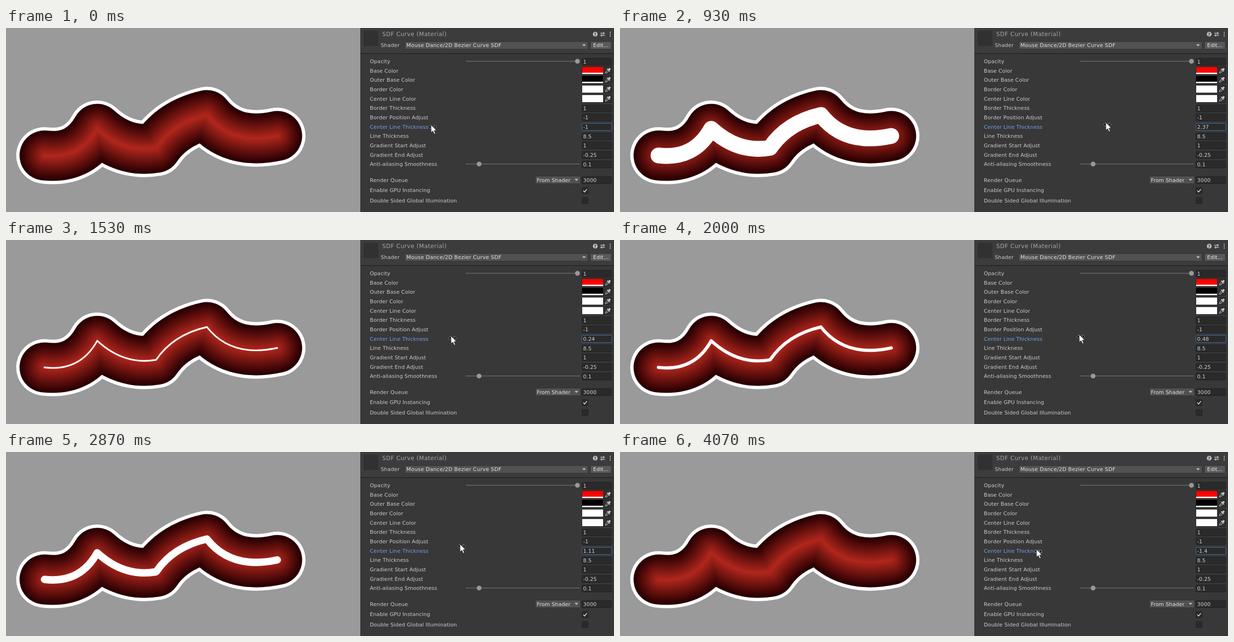
An HTML page that plays this animation: 1280x387 px, repeating every 4870 ms.

```html
<!DOCTYPE html>
<html lang="en">
<head>
<meta charset="utf-8">
<title>SDF curve inspector</title>
<style>
html, body { margin: 0; height: 100%; overflow: hidden; background: #9a9a9a }
svg { display: block; width: 100%; height: 100% }
text { font: 11px "DejaVu Sans", sans-serif; letter-spacing: .1px; fill: #cbcbcb; white-space: pre }
.tube use { fill: none; stroke-linecap: round; stroke-linejoin: round }
</style>
</head>
<body>
<svg id="stage" viewBox="0 0 1280 387"></svg>
<script>
const LOOP = 4870, STEP = 1000 / 15;
const UNIT = 7;               // pixels per thickness unit
const ROW = 19.64, FIRST_ROW = 70.1;
const EDGE = 7.5 * UNIT;      // radius where the border begins

const text = (x, y, s, attrs = '') => `<text x="${x}" y="${y}" ${attrs}>${s}</text>`;
const rect = (x, y, w, h, fill, attrs = '') =>
  `<rect x="${x}" y="${y}" width="${w}" height="${h}" fill="${fill}" ${attrs}/>`;
const box = (x, y, w, h, fill, stroke = '#212121') =>
  rect(x + .5, y + .5, w - 1, h - 1, fill, `rx="2" stroke="${stroke}"`);
const caret = (x, y) => `<path d="M${x - 4} ${y - 2}h8l-4 4z" fill="#c4c4c4"/>`;
const checkbox = y => box(1212, y - 7, 14, 14, '#2a2a2a');
const dropper = y => `<g transform="translate(1267 ${y}) rotate(45)" fill="#c4c4c4">
  <path d="M-2-7h4v4h2v2h-8v-2h2z"/><path d="M-1.5-1V5L0 7 1.5 5V-1" fill="none" stroke="#c4c4c4"/></g>`;

function field(row, value, attrs = '', stroke) {
  const y = Math.ceil(row);
  return box(1212, y - 8, 64, 16, '#2a2a2a', stroke) +
    text(1215, y + 4, value, `style="fill:#d2d2d2" ${attrs}`);
}

function swatch(row, color) {
  const y = Math.round(row);
  return box(1212, y - 9, 64, 17, '#303030') + rect(1213, y - 8, 44, 15, '#fff') +
    rect(1213, y - 8, 44, 12, color) + dropper(y);
}

const slider = (y, x) =>
  rect(968, Math.round(y) - 1, 240, 2, '#5e5e5e') + `<circle cx="${x}" cy="${y}" r="5" fill="#999"/>`;

const shade = r => {
  const k = Math.max(0, 1 - r / 50);
  return `rgb(${42 + 136 * k},${39 * k},${2 + 27 * k})`;
};

function tube() {
  const ring = (r, color) => `<use href="#curve" stroke="${color}" stroke-width="${2 * r}"/>`;
  let rings = ring(8.5 * UNIT, '#fff');
  for (let r = EDGE; r > 0; r--) rings += ring(r, shade(r));
  return `<defs><path id="curve" d="M81 268Q156 277 192 212Q249 264 316 252Q352 199 423 183Q474 248 571 227"/></defs>
    <g class="tube">${rings}<use id="center" href="#curve" stroke="#fff"/></g>`;
}

function header() {
  return rect(746, 0, 534, 387, '#383838') + rect(746, 0, 534, 53, '#3c3c3c') +
    rect(746, 53, 534, 1.5, '#232323') + rect(746, 0, 1, 387, '#2b2b2b') +
    rect(753, 6, 31, 32, '#313131') +
    text(792, 17, 'SDF Curve (Material)', 'style="font-size:12px;letter-spacing:.55px;fill:#a8a8a8"') +
    text(789, 40, 'Shader') +
    box(839, 28, 387, 17, '#515151', '#303030') +
    text(843, 40, 'Mouse Dance/2D Bezier Curve SDF', 'style="fill:#e4e4e4;letter-spacing:.25px"') + caret(1217, 36.5) +
    box(1230, 28, 45, 17, '#585858', '#303030') + text(1236, 40, 'Edit...', 'style="fill:#eee"') +
    `<circle cx="1240.5" cy="13" r="5" fill="#c4c4c4"/>` +
    text(1240.5, 16.5, '?', 'text-anchor="middle" style="font-size:9px;font-weight:bold;fill:#3c3c3c"') +
    `<path d="M1251 11h10M1251 15.500h10M1258 8.500v5M1254 13v5" stroke="#c4c4c4" stroke-width="1.5"/>` +
    [9, 13, 17].map(y => rect(1271, y - 1, 2, 2, '#c4c4c4')).join('');
}

function properties() {
  const rows = [
    ['Opacity', y => slider(y, 1203) + field(y, 1)],
    ['Base Color', y => swatch(y, '#f00')],
    ['Outer Base Color', y => swatch(y, '#000')],
    ['Border Color', y => swatch(y, '#fff')],
    ['Center Line Color', y => swatch(y, '#fff')],
    ['Border Thickness', y => field(y, 1)],
    ['Border Position Adjust', y => field(y, -1)],
    ['Center Line Thickness', y => field(y, '', 'id="value"', '#3a72b0'), 'style="fill:#72a0ea"'],
    ['Line Thickness', y => field(y, 8.5)],
    ['Gradient Start Adjust', y => field(y, 1)],
    ['Gradient End Adjust', y => field(y, -.25)],
    ['Anti-aliasing Smoothness', y => slider(y, 996) + field(y, .1)]
  ];
  return rows.map(([label, control, style], i) => {
    const y = FIRST_ROW + i * ROW;
    return text(766, Math.round(y) + 4, label, style) + control(y);
  }).join('') +
    text(766, 323.5, 'Render Queue') + box(1114, 311, 96, 17, '#515151', '#303030') +
    text(1117.5, 323.5, 'From Shader', 'style="fill:#e4e4e4"') + caret(1201, 319.5) + field(320, 3000) +
    text(766, 345, 'Enable GPU Instancing') + checkbox(342) +
    '<path d="M1215.500 342l2.500 3 5-6" fill="none" stroke="#ddd" stroke-width="1.7"/>' +
    text(766, 367, 'Double Sided Global Illumination') + checkbox(363);
}

const pointer = `<g id="pointer">
  <path d="M-4 4l4-3.500v7zM12 4l-4-3.500v7z" fill="#000" stroke="#fff" stroke-width="1" paint-order="stroke"/>
  <path d="M1 0V16L4.700 12.600 7.500 19 10 18 7.300 11.700H12.200z" fill="#fff" stroke="#222" stroke-width=".8"/></g>`;

stage.innerHTML = tube() + header() + properties() + pointer;
const [center, value, hand] = ['center', 'value', 'pointer'].map(id => document.getElementById(id));

// Each drag eases the pose on to { x, y, thickness } between two steps.
const rest = { x: 894, y: 204, thickness: -1 };
const drags = [
  { from: 8, to: 17, x: 1067, y: 197, thickness: 3.55 },
  { from: 17, to: 24, x: 928, y: 202, thickness: .045 },
  { from: 24, to: 30, x: 966, y: 199, thickness: .48 },
  { from: 30, to: 35, x: 1093, y: 192, thickness: 4.98 },
  { from: 38, to: 46, x: 891, y: 195, thickness: -.68 },
  { from: 46, to: 49, x: 878, y: 193, thickness: -1.62 },
  { from: 54, to: 56, x: 885, y: 194, thickness: -1.4 },
  { from: 57, to: 61, x: 876, y: 205, thickness: -1.4 }
];
const clamp = f => Math.min(1, Math.max(0, f));
const ease = f => f * f * (3 - 2 * f);

function poseAt(step) {
  const pose = { ...rest };
  for (const drag of drags) {
    const f = ease(clamp((step - drag.from) / (drag.to - drag.from)));
    for (const key in pose) pose[key] += (drag[key] - pose[key]) * f;
  }
  return pose;
}

function draw(now) {
  const { x, y, thickness } = poseAt(Math.floor((now % LOOP + 5) / STEP));
  center.setAttribute('stroke-width', Math.max(0, 2 * UNIT * thickness));
  value.textContent = +thickness.toFixed(2);
  hand.setAttribute('transform', `translate(${Math.round(x)} ${Math.round(y)})`);
  requestAnimationFrame(draw);
}
draw(0);
</script>
</body>
</html>
```
